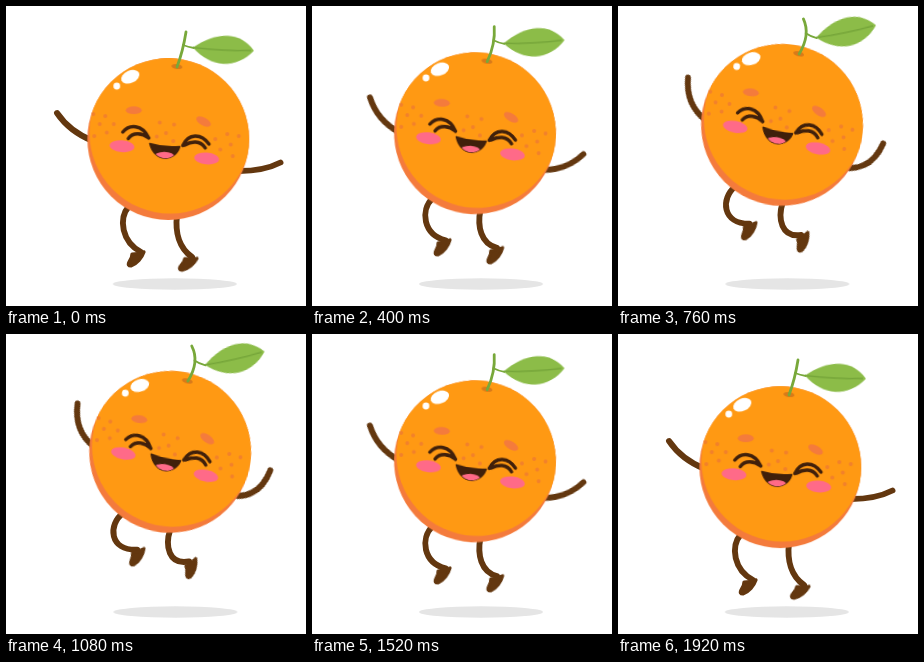
These frames come from a looping animation (300x300 px, 2000 ms). An HTML page:

```html
<!DOCTYPE html>
<html lang="en">
<head>
<meta charset="utf-8">
<title>Jumping orange</title>
<style>
html, body { margin: 0; width: 100%; height: 100%; overflow: hidden; background: #fff; }
svg { display: block; width: 100vw; height: 100vh; }

/* Each part goes from its low pose to its high pose and back, then rests briefly. */
@keyframes move {
  0%, 96%, 100% { transform: var(--low); }
  48% { transform: var(--high); }
}
@keyframes bend {
  0%, 96%, 100% { d: var(--low-d); }
  48% { d: var(--high-d); }
}
.move, .bend {
  animation-duration: 2s;
  animation-iteration-count: infinite;
  animation-timing-function: cubic-bezier(.37, 0, .63, 1);
}
.move { animation-name: move; transform: var(--low); }
.bend { animation-name: bend; d: var(--low-d); }

.limb { fill: none; stroke: #63370f; stroke-width: 5.9; stroke-linecap: round; }
.foot { fill: #63370f; stroke: #63370f; stroke-width: 3.2; stroke-linejoin: round; }
.face { fill: none; stroke: #40200b; stroke-width: 3.4; stroke-linecap: round; }
.freckles { fill: none; stroke: #f2812b; stroke-width: 4; stroke-linecap: round; }
.stem { fill: none; stroke: #78a83a; stroke-width: 2.8; stroke-linecap: round; }
.rim { fill: #f47b3c; }
.pink { fill: #ff6a88; }

#shadow { --low: translate(168.8px, 278px); --high: translate(169.4px, 278px); }
#body { --low: translate(162.3px, 133.1px) rotate(0deg); --high: translate(164.2px, 117.3px) rotate(7.1deg); }

#arm-l { --low: translate(84px, 134px) rotate(0deg); --high: translate(86px, 109.5px) rotate(33.5deg); }
#arm-l path {
  --low-d: path("M3 1 Q-20.5 -8.5 -33 -27");
  --high-d: path("M3 1 Q-22.5 -1.5 -34 -27");
}
#arm-r { --low: translate(237px, 165px) rotate(0deg); --high: translate(235px, 160px) rotate(-28deg); }
#arm-r path {
  --low-d: path("M-4 0 Q21 0 37.5 -8.5");
  --high-d: path("M-4 0 Q16.4 10.5 36.8 -8");
}

#leg-l {
  --low-d: path("M123 200 C112 213 116 236 135 246");
  --high-d: path("M117 178 C101 190 103 216 131 214.5");
}
#leg-r {
  --low-d: path("M171 209 C169 226 173 242 186 251");
  --high-d: path("M164 195 C158.5 211 162 231 183 226.5");
}
#foot-l { --low: translate(135px, 246px) rotate(0deg); --high: translate(135px, 214px) rotate(-11deg); }
#foot-r { --low: translate(188px, 252px) rotate(9deg); --high: translate(187px, 225px) rotate(-28deg); }

#stem {
  --low-d: path("M171 61 Q177 45 180 26");
  --high-d: path("M182.3 46.5 Q194.5 27 186 11.5");
}
#twig {
  stroke-width: 1.8;
  --low-d: path("M177 39 Q182 41 188 42");
  --high-d: path("M189 26 Q193 29 200 31");
}
#leaf { --low: translate(187px, 41.5px) rotate(3deg); --high: translate(199.5px, 30.5px) rotate(-13.3deg); }
</style>
</head>
<body>
<svg viewBox="0 0 300 300">
  <defs>
    <clipPath id="round"><circle r="80.9"/></clipPath>
    <path id="mouth" d="M-18.5 4.5 Q-4 9 11.5 7.5 C6.5 23.5 -13.5 23.5 -18.5 4.5Z"/>
    <clipPath id="in-mouth"><use href="#mouth"/></clipPath>
    <path id="shoe" d="M3 0 C1 6 -4 12 -10 14 Q-14 14 -12 10 Q-9 6 -9 2 Q-3 2 3 0Z"/>
  </defs>

  <ellipse id="shadow" class="move" rx="62" ry="5.8" fill="#e5e5e5"/>

  <path id="leg-l" class="limb bend"/>
  <path id="leg-r" class="limb bend"/>
  <g id="foot-l" class="foot move"><use href="#shoe"/></g>
  <g id="foot-r" class="foot move"><use href="#shoe"/></g>
  <g id="arm-l" class="move"><path class="limb bend"/></g>
  <g id="arm-r" class="move"><path class="limb bend"/></g>

  <g id="body" class="move">
    <circle class="rim" r="80.9"/>
    <circle cx="2" cy="-6.3" r="80.8" fill="#ff9913" clip-path="url(#round)"/>
    <ellipse cx="8.6" cy="-72.5" rx="5.5" ry="2.5" transform="rotate(7 8.6 -72.5)" fill="#d87a1a"/>

    <g fill="#fff">
      <ellipse rx="9.6" ry="6.2" transform="translate(-38 -62.3) rotate(-24)"/>
      <circle cx="-51.5" cy="-53" r="3.4"/>
    </g>

    <path class="freckles" d="M-75 -25h.01M-63 -23h.01M-68.5 -15h.01M-54.5 -15h.01M-74 -3h.01M-61.5 -6.5h.01
      M-8.5 -16.5h.01M5.8 -14.5h.01M-11.5 -2.5h.01M-2.3 -6h.01M5 2h.01
      M59 -5h.01M70.5 -3h.01M47 0h.01M62.5 5.5h.01M52 10.5h.01M64.5 17h.01"/>

    <g class="rim">
      <ellipse rx="8" ry="3.9" transform="translate(-34.5 -28.8)"/>
      <ellipse rx="8" ry="4" transform="translate(35.3 -17.5) rotate(28)"/>
    </g>
    <g class="pink">
      <ellipse rx="12.4" ry="5.9" transform="translate(-46.3 7.2) rotate(5)"/>
      <ellipse rx="12.4" ry="5.9" transform="translate(38.4 19.4) rotate(5)"/>
    </g>

    <path class="face" d="M-45.5 -7 C-39 -15 -26 -15 -19.5 -1 M-40 -.5 C-35 -7.5 -26 -6 -19.5 -1
      M14.5 6.5 C20 -6 33 -6 40.7 5 M16.5 6 C23 2 32 1 37 8.8"/>
    <use href="#mouth" fill="#40200b" stroke="#40200b" stroke-width="1.5" stroke-linejoin="round"/>
    <ellipse class="pink" cx="-4" cy="18" rx="10.5" ry="5.2" clip-path="url(#in-mouth)"/>
  </g>

  <path id="stem" class="stem bend"/>
  <path id="twig" class="stem bend"/>
  <g id="leaf" class="move">
    <path d="M0 0 C22 -17 46 -19 61 0 C46 18 20 21 0 0Z" fill="#8cbc48"/>
    <path d="M0 0 Q30 2 58 0" fill="none" stroke="#76a63a" stroke-width="1.4"/>
  </g>
</svg>
</body>
</html>
```
